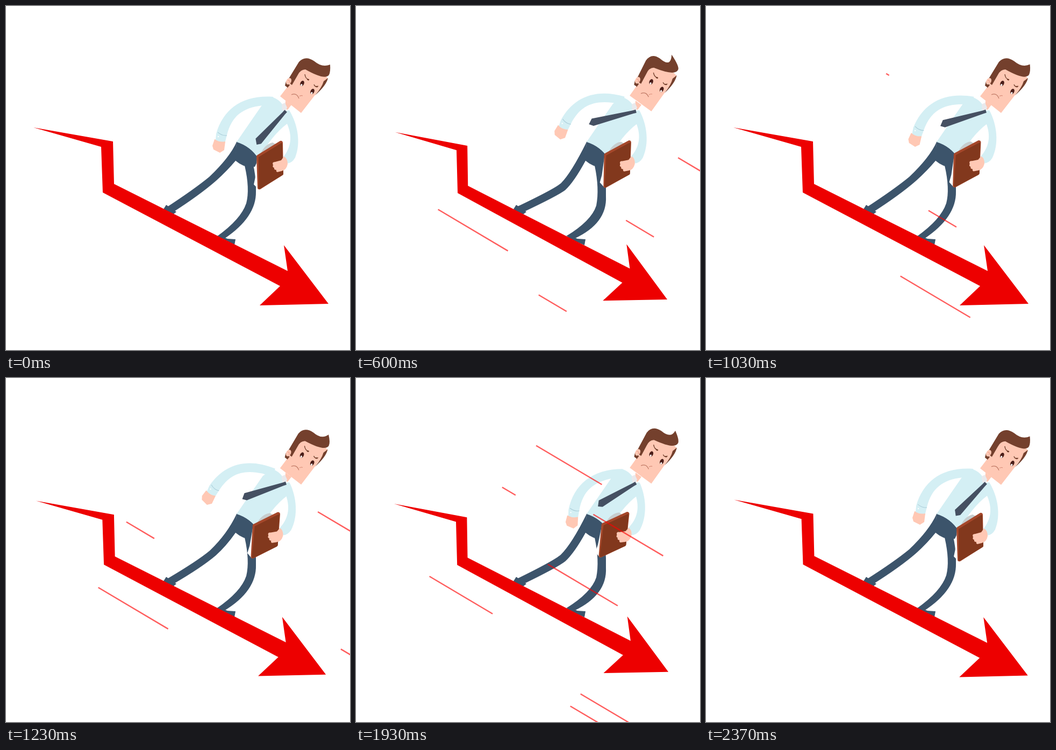
An HTML page with a canvas that plays this animation: 640x640 px, repeating every 2410 ms.

```html
<!DOCTYPE html>
<html lang="en">
<head>
<meta charset="utf-8">
<title>Sliding down</title>
<style>
  html, body { margin: 0; width: 100%; height: 100%; overflow: hidden; background: #fff; }
  canvas { display: block; }
</style>
</head>
<body>
<canvas id="stage" width="640" height="640"></canvas>
<script>
const ctx = document.getElementById('stage').getContext('2d');
const LOOP = 2410;
const SHIRT = '#d4eff4', PANTS = '#3c546b', SKIN = '#ffc8b4', HAIR = '#74402d', RED = '#ed0000';

// Rises from 0 at start to height at peak, then back to 0 at end
function pulse(t, start, peak, end, height, power = 1.2) {
  const x = t < peak ? (t - start) / (peak - start) : (end - t) / (end - peak);
  return x > 0 ? height * Math.sin(x * Math.PI / 2) ** power : 0;
}

// He ducks twice per loop while the arms and the tie swing in the wind
const poseAt = t => ({
  stretch: pulse(t, 0, 430, 1030, 1.03) + pulse(t, 1110, 1750, 2410, .92),
  bend: pulse(t, 0, 430, 960, 1.03) + pulse(t, 1080, 1750, 2410, .9),
  hair: pulse(t, 0, 480, 1050, 1.15) + pulse(t, 1050, 1750, 2400, .58),
  leftArm: pulse(t, 0, 430, 950, 15) + pulse(t, 950, 1280, 1900, 19) - pulse(t, 1800, 1930, 2200, 4),
  rightArm: pulse(t, 0, 350, 800, 5.5) + pulse(t, 850, 1200, 1400, 5.5)
    - pulse(t, 1400, 1570, 1740, 13.6) + pulse(t, 1740, 1930, 2300, 7),
  tieAngle: 49 - pulse(t, 0, 400, 2390, 35, .6),
  tieLength: 1 + pulse(t, 0, 700, 1500, .1)
});

// Blend two path strings number by number, x and y separately
function mix(a, b, kx, ky = kx) {
  const targets = b.match(/-?[\d.]+/g);
  let i = 0;
  return a.replace(/-?[\d.]+/g, v => +v + (targets[i] - v) * (i++ % 2 ? ky : kx));
}

function fill(path, color) {
  ctx.fillStyle = color;
  ctx.fill(new Path2D(path));
}

function line(path, color, width) {
  ctx.strokeStyle = color;
  ctx.lineWidth = width;
  ctx.stroke(new Path2D(path));
}

function oval(x, y, rx, ry, color, angle = 0) {
  ctx.fillStyle = color;
  ctx.beginPath();
  ctx.ellipse(x, y, rx, ry, angle, 0, 7);
  ctx.fill();
}

function pivot(x, y, degrees, draw) {
  ctx.save();
  ctx.translate(x, y);
  ctx.rotate(degrees * Math.PI / 180);
  ctx.translate(-x, -y);
  draw();
  ctx.restore();
}

function drawLegs(k) {
  fill('M293,378L298,370L304,374L317,383L308,390Z', PANTS);
  fill('M391,430L400,428L412,433L427,434L425,445Z', PANTS);
  fill(mix('M429,253Q416,282 378,318Q350,341 298,375L310,384Q360,352 391,325Q412,306 427,288Z',
           'M429,253Q398,315 382,331Q374,339 298,374L310,384Q378,353 389,345Q405,330 427,288Z', k), PANTS);
  fill(mix('M444,297Q454,340 447,367Q437,397 392,429L406,433Q466,393 465,345L465,335Q464,312 460,296Z',
           'M444,297Q453,340 447,372Q438,400 391,428L406,433Q468,406 465,355L465,335Q464,312 460,296Z', k), PANTS);
  fill('M429,252Q455,261 470,284L463,299Q445,303 426,287Z', PANTS);
}

function drawArrow(kx, ky) {
  fill(mix('M51,226L199,252L201,331L524,493L517,445L600,554L472,557L510,521L180,347L177,262Z',
           'M75,236L208,261L209,335L508,488L502,443L577,545L458,547L494,514L190,348L188,269Z', kx, ky), RED);
}

function drawTorso() {
  fill('M478,182L497,170Q508,174 514,183L520,195L527,194Q530,205 523,219Q495,240 470,284Q455,261 429,253Q455,215 478,182Z', SHIRT);
  fill('M520,176L531,184L524,193L519,191Z', SKIN);
  fill('M513,183L519,180L523,189L520,196L514,194Z', '#e9e9ec');
}

function drawLeftArm() {
  fill('M388,248L384,260L386,267L398,273L406,268L408,252Z', SKIN);
  fill('M497,169C440,165 404,192 391,238L390,249Q398,254 408,252L411,240C420,205 440,189 478,185L500,186Z', SHIRT);
  line('M394,235Q402,242 411,241', '#a9ccd8', 1);
  oval(395, 243, 1.2, 1.2, '#fff');
}

function drawTie(angle, length) {
  ctx.save();
  ctx.translate(520, 196);
  ctx.rotate(-angle * Math.PI / 180);
  ctx.scale(length, 1);
  fill('M1,-3L-5,-3L-75,-7L-82,2L-75,7L-5,3L1,3Z', '#455062');
  ctx.restore();
}

function drawRightArm() {
  fill('M467,281L464,318L461,332L470,341Z', '#fff');
  fill('M474,274Q482,257 496,254L502,257Z', '#c7cdce');
  fill('M466,280Q466,278 468,277L510,251Q514,250 515,254L516,312Q516,314 514,315L473,341Q468,342 468,338Z', '#a5472a');
  fill('M470,281L512,255Q514,254 514,257L516,312Q516,314 514,315L473,340Q470,341 470,338Z', '#82381d');
  fill('M527,194C543,220 549,255 538,282Q532,293 522,293L516,281C530,263 534,243 522,217Z', SHIRT);
  fill('M517,280Q524,283 524,294Q522,305 513,307L505,309Q502,308 503,305Q498,305 499,301Q495,300 497,296Q494,290 501,290L512,287Z', SKIN);
}

function drawHead(hair) {
  fill('M510,168L549,199L577,163L599,135L575,108L550,112L527,146Z', SKIN);
  fill('M521,140L519,148L524,152L528,147Z', HAIR);
  fill(mix('M523,140L545,104Q557,91 574,103Q588,115 603,109Q604,122 601,128Q594,139 557,118Q548,118 543,128L532,147Z',
           'M523,140L543,104Q554,90 569,101Q589,120 592,96Q605,118 602,124Q596,136 557,118Q548,118 543,128L532,147Z', hair), HAIR);
  fill('M599,134Q596,148 575,166Q588,151 591,140Z', HAIR);
  oval(526, 140, 4.5, 6.5, SKIN, .5);
  line('M524,138Q529,138 527,144', '#e89c88', 1);
  for (const [x, y] of [[551, 144], [570, 159]]) {
    oval(x, y, 3.5, 5.2, '#4a1d18', .45);
    oval(x - 1.2, y + 3, 1.6, 2, '#fff', .45);
  }
  line('M556,127Q557,136 564,137', HAIR, 1.4);
  line('M573,146Q575,152 581,149', HAIR, 1.4);
  oval(562, 137, 2.2, 1.3, HAIR, .3);
  oval(578, 150, 2.2, 1.2, HAIR, .2);
  line('M531,165Q541,161 545,172', '#c07a66', 1.3);
  line('M546,168Q548,166 552,167', '#d98d79', 1.2);
}

// Wind lanes: height offset, usual length, first launch, pause between launches
const lanes = [
  [-95, 150, 1168], [-73, 150, 558, 1044], [-8, 140, 1722], [42, 52, 26, 1407], [101, 52, 456],
  [135, 52, 793, 420], [288, 130, 88, 650], [336, 52, 285], [340, 140, 1092, 605], [374, 120, 1370, 307]
];

// Streaks fly up the slope from the right edge and shrink away on a line across it
function drawStreaks(t) {
  const SPEED = .95, SLOPE = .593, LIFE = 550, LAST_LAUNCH = 1730;
  ctx.globalAlpha = .64;
  for (const [lane, length, first, gap = LOOP] of lanes) {
    const end = 295 - .55 * lane;
    for (let launch = first; launch < LAST_LAUNCH; launch += gap) {
      const age = t - launch, left = 640 - SPEED * age;
      const head = Math.max(left, end), tail = left + (launch > 1300 ? 130 : length);
      if (age > 0 && age < LIFE && tail > head) {
        line(`M${head},${head * SLOPE + lane}L${tail},${tail * SLOPE + lane}`, '#f00', 2.4);
      }
    }
  }
  ctx.globalAlpha = 1;
}

function frame(now) {
  const t = now % LOOP, pose = poseAt(t);
  ctx.fillStyle = '#fff';
  ctx.fillRect(0, 0, 640, 640);
  drawLegs(pose.bend);
  drawArrow(pose.stretch, pose.bend);
  pivot(500, 180, pose.leftArm, drawLeftArm);
  drawTorso();
  drawTie(pose.tieAngle, pose.tieLength);
  pivot(523, 200, pose.rightArm, drawRightArm);
  pivot(524, 185, -2.7 * pose.stretch, () => {
    ctx.translate(0, -2 * pose.stretch);
    drawHead(pose.hair);
  });
  drawStreaks(t);
  requestAnimationFrame(frame);
}
requestAnimationFrame(frame);
</script>
</body>
</html>
```
